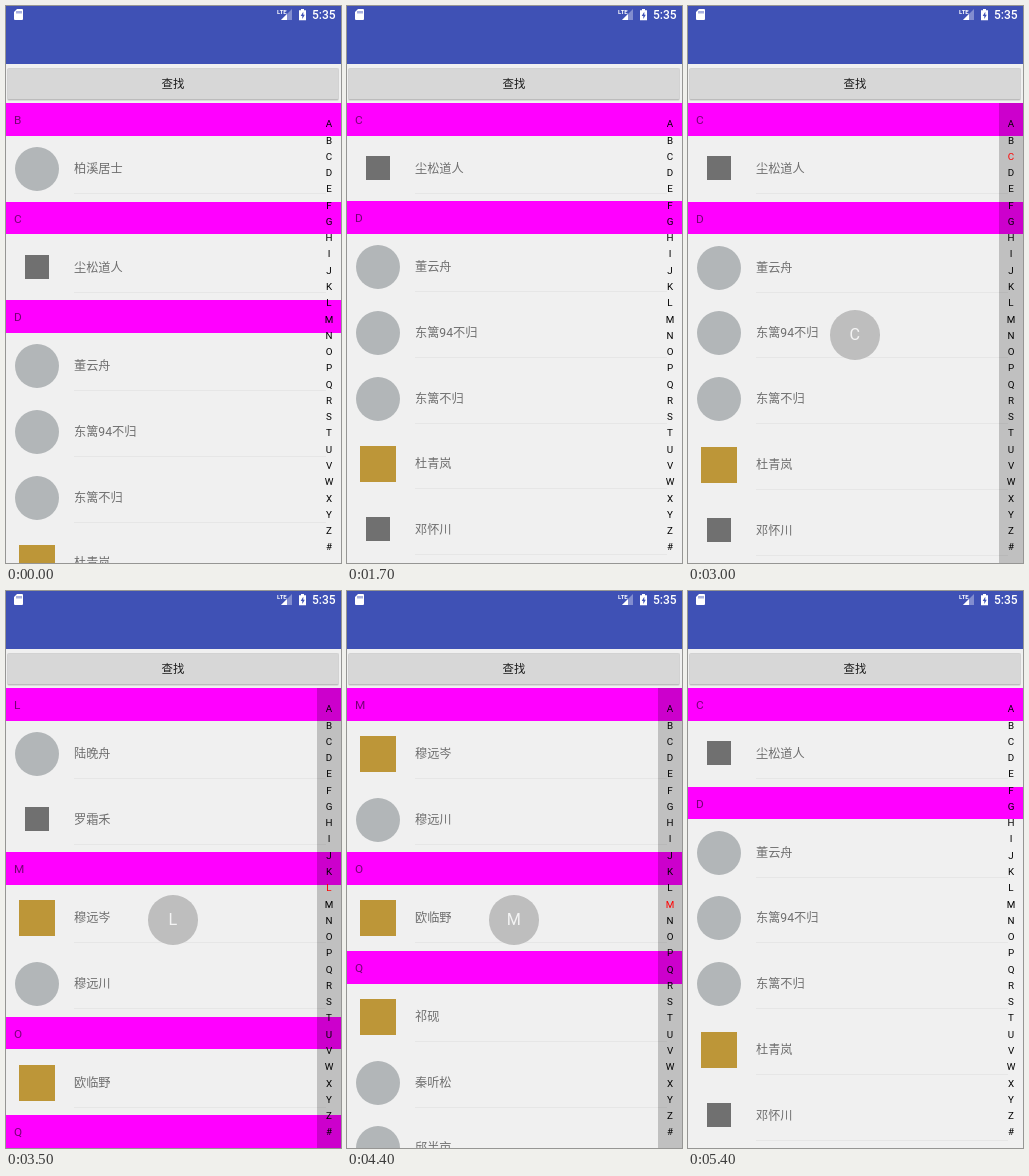
An HTML page that plays this animation: 335x557 px, repeating every 6.5 s.

```html
<!DOCTYPE html>
<html lang="zh-CN">
<head>
<meta charset="utf-8">
<title>Index list</title>
<style>
html, body { margin: 0; width: 100%; height: 100%; overflow: hidden; background: #f0f0f0; }
body { font-family: Roboto, "Noto Sans CJK SC", "Noto Sans CJK", sans-serif; }
#stage { position: relative; width: 335px; height: 557px; overflow: hidden; background: #f0f0f0; }
#stage div, #stage svg { position: absolute; box-sizing: border-box; }
#bar { left: 0; top: 0; width: 335px; height: 58px; background: #3f51b5; }
#clock { left: 306px; top: 2px; font-size: 12px; line-height: 14px; font-weight: 500; color: #fff; }
#find {
  left: 1px; top: 62px; width: 332px; height: 32px; border-radius: 2px;
  background: #d7d7d7;
  border: 1px solid #d2d2d2; border-bottom-color: #bcbcbc;
  box-shadow: 0 1px 0 #dadada;
  font-size: 11.4px; line-height: 31px; text-align: center; color: #1c1c1c;
}
#list { left: 0; top: 97px; width: 335px; height: 460px; overflow: hidden; }
#list .head {
  left: 0; width: 335px; height: 33px; padding-left: 8px; background: #f0f;
  font-size: 11.8px; line-height: 34px; color: rgba(0, 0, 0, .54);
}
#list .row { left: 0; width: 335px; height: 66px; }
.row .name { left: 68px; top: 0; font-size: 12.2px; line-height: 66px; white-space: nowrap; color: rgba(0, 0, 0, .54); }
.row .line { left: 68px; top: 57px; width: 252px; height: 1px; background: #e6e6e6; }
.ring { left: 9px; top: 11px; width: 44px; height: 44px; border-radius: 50%; background: #b2b6b8; }
.dark { left: 19px; top: 20px; width: 24px; height: 24px; background: #707070; }
.gold { left: 13px; top: 15px; width: 36px; height: 36px; background: #bd9638; }
#index { left: 311px; top: 97px; width: 24px; height: 460px; }
#index div { left: 0; width: 24px; height: 16px; font-size: 9.8px; line-height: 16px; text-align: center; color: #000; }
#index.down { background: rgba(0, 0, 0, .2); }
#index .on { color: #f00; }
#tip {
  left: 142px; top: 304px; width: 49.5px; height: 49.5px; border-radius: 50%; background: #bebebe;
  font-size: 16.2px; line-height: 50px; text-align: center; color: #f4f4f4;
}
</style>
</head>
<body>
<div id="stage">
  <div id="bar">
    <svg width="335" height="20" viewBox="0 0 335 20" fill="#fff">
      <path d="M11 3h5q1 0 1 1v9q0 1-1 1h-7q-1 0-1-1v-7z"/>
      <path d="M11 5v2.500M13 5v2.500M15 5v2.500" stroke="#3f51b5" stroke-width=".9"/>
      <path d="M286 3v11h-11z" fill-opacity=".35"/>
      <path d="M281 8v6h-6z"/>
      <text x="271" y="7.500" font-size="6" font-weight="700">LTE</text>
      <path d="M295 3h3v1.300h2v10h-7v-10h2z"/>
      <path d="M297.300 5.800l-2.600 4.200h1.600v3l2.500-4.200h-1.500z" fill="#3f51b5"/>
    </svg>
    <div id="clock">5:35</div>
  </div>
  <div id="find">查找</div>
  <div id="list"></div>
  <div id="index"></div>
  <div id="tip"></div>
</div>
<script>
const LOOP = 6500, HEAD = 32.88, ROW = 65.76, BAND = 32.5;

// section letter, then names with the badge of each
const SECTIONS = [
  ['B', '柏溪居士 ring'],
  ['C', '尘松道人 dark'],
  ['D', '董云舟 ring', '东篱94不归 ring', '东篱不归 ring', '杜青岚 gold', '邓怀川 dark', '戴穗 dark'],
  ['G', '顾晚亭 gold', '葛星河 ring'],
  ['H', '何知雨 ring', '贺林溪 dark', '胡远岫 gold'],
  ['J', '江照野 dark', '纪寒汀 ring'],
  ['L', '陆晚舟 ring', '罗霜禾 dark'],
  ['M', '穆远岑 gold', '穆远川 ring'],
  ['O', '欧临野 gold'],
  ['Q', '祁砚 gold', '秦听松 ring', '邱半亩 ring'],
  ['S', '宋问渠 dark', '沈栖梧 gold'],
  ['W', '温见山 ring', '吴半夏 dark'],
  ['Z', '周念秋 gold', '郑拾雪 ring']
];

// a number scrolls the list, a letter presses the index, '' lets it go
const STEPS = [
  [0, 0], [1400, 29.1], [1500, 50], [1600, 69], [1700, 99], [1800, 113], [1900, 123],
  [2000, 132], [2100, 143.6], [2200, 160], [2300, 174], [2400, 182],
  [3000, 'C'], [3100, 'D'], [3200, 'F'], [3300, 'H'], [3400, 'J'], [3500, 'L'], [3600, 'M'],
  [3700, 'N'], [3800, 'O'], [4000, 'P'], [4300, 'N'], [4400, 'M'], [4500, 'L'], [4600, 'J'],
  [4700, 'H'], [4800, 'G'], [4900, 'F'], [5000, 'E'], [5200, 'C'], [5400, '']
];

const $ = id => document.getElementById(id);

function add(parent, cls, text = '') {
  const el = document.createElement('div');
  el.className = cls;
  el.textContent = text;
  parent.append(el);
  return el;
}

const rows = [], heads = [], starts = {};
let end = 0;

for (const [letter, ...people] of SECTIONS) {
  const head = { el: add($('list'), 'head', letter), top: end, letter };
  heads.push(head);
  starts[letter] = end;
  end += HEAD;
  for (const person of people) {
    const [name, badge] = person.split(' ');
    const el = add($('list'), 'row');
    add(el, badge);
    add(el, 'name', name);
    add(el, 'line');
    rows.push({ el, top: end });
    end += ROW;
  }
}
const sticky = add($('list'), 'head');

const keys = [...'ABCDEFGHIJKLMNOPQRSTUVWXYZ#'].map((letter, i) => {
  const el = add($('index'), '', letter);
  el.style.top = 13.3 + i * 16.27 + 'px';
  return { el, letter };
});

function stateAt(time) {
  let y = 0, key = '';
  for (const [at, step] of STEPS) {
    if (at > time) break;
    if (typeof step === 'number') y = step;
    else {
      key = step;
      if (key in starts) y = starts[key];
    }
  }
  return { y, key };
}

function draw(time) {
  const { y, key } = stateAt(time);
  for (const row of rows) row.el.style.top = Math.round(row.top - y) + 'px';
  for (const { el, top } of heads) {
    const from = Math.round(top - y);
    el.style.top = from + 'px';
    el.style.height = Math.round(top - y + BAND) - from + 'px';
  }

  const next = heads.findIndex(h => h.top > y + 0.01);
  const push = Math.min(0, Math.round(heads[next].top - y) - 33);
  sticky.textContent = heads[next - 1].letter;
  sticky.style.top = push + 'px';

  $('index').className = key ? 'down' : '';
  for (const k of keys) k.el.className = k.letter === key ? 'on' : '';
  $('tip').style.display = key ? 'block' : 'none';
  $('tip').textContent = key;
}

const begin = performance.now();
function tick() {
  draw((performance.now() - begin) % LOOP);
  requestAnimationFrame(tick);
}
tick();
</script>
</body>
</html>
```
